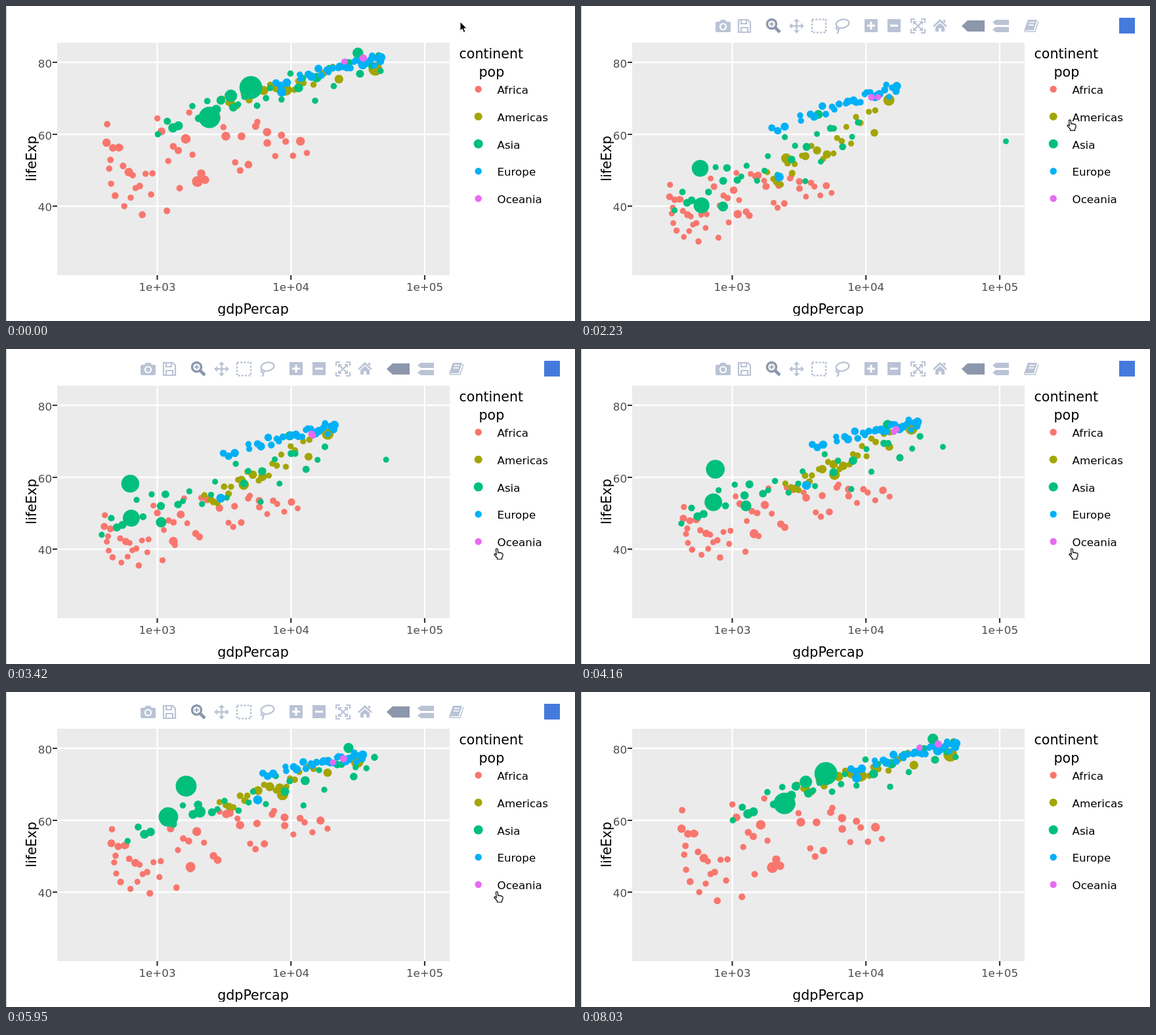
Write an HTML page that moves like this. It is 867x481 px and loops after 8480 ms.

```html
<!DOCTYPE html>
<html lang="en">
<head>
<meta charset="utf-8">
<title>Life expectancy and income</title>
<style>
  html, body { margin: 0; width: 100%; height: 100%; overflow: hidden; background: #fff; }
  svg { display: block; width: 867px; height: 481px; font: 16.7px "DejaVu Sans", Verdana, sans-serif; }
  .title { font-size: 20.6px; }
  .tick { fill: #4d4d4d; }
</style>
</head>
<body>
<svg viewBox="0 0 867 481">
  <path d="M.5 0V481" stroke="#cfcfcf" stroke-width="1.6"/>
  <path d="M78 56H676V411H78Z" fill="#ebebeb"/>
  <path d="M78 86H676M78 196H676M78 305.7H676M230.5 56V411M434.2 56V411M638 56V411" stroke="#fff" stroke-width="2.3"/>
  <path d="M71 86H78M71 196H78M71 305.7H78M230.5 411V418M434.2 411V418M638 411V418" stroke="#333" stroke-width="2.2"/>
  <g class="tick" text-anchor="end">
    <text x="70" y="94">80</text><text x="70" y="204">60</text><text x="70" y="313">40</text>
  </g>
  <g class="tick" text-anchor="middle">
    <text x="230.5" y="435">1e+03</text><text x="434.2" y="435">1e+04</text><text x="638" y="435">1e+05</text>
  </g>
  <g class="title">
    <text x="376.5" y="470" text-anchor="middle">gdpPercap</text>
    <text transform="translate(46 233) rotate(-90)" text-anchor="middle">lifeExp</text>
    <text x="690.5" y="80">continent</text><text x="720.5" y="108">pop</text>
  </g>
  <path d="M300 473H460V481H300Z" fill="#fff"/>
  <g id="legend"></g>
  <g id="dots"></g>
  <g id="toolbar" fill="#bac3d5" stroke="#bac3d5" stroke-width="0">
    <path d="M207 24H211L213 21H220L222 24H226Q228 24 228 26V38Q228 40 226 40H207Q205 40 205 38V26Q205 24 207 24Z"/>
    <circle cx="216.5" cy="31.5" r="4.5" fill="none" stroke="#fff" stroke-width="2.2"/>
    <path d="M240 21H254L258 25V40H240Z M244 21V27H252V21 M244 40V33H254V40" fill="none" stroke-width="2.2"/>
    <g fill="none" stroke="#8c97ab">
      <circle cx="290.5" cy="27.5" r="7" stroke-width="3.4"/>
      <path d="M296 33L303 40" stroke-width="4.6"/><path d="M287 27.5H294M290.5 24V31" stroke-width="1.6"/>
    </g>
    <path d="M328.5 22V39M320 30.5H337" stroke-width="2.4"/>
    <path d="M328.5 19L333 24H324ZM328.5 42L333 37H324ZM317 30.5L322 26V35ZM340 30.5L335 26V35Z"/>
    <path d="M352 20.5H373V40.5H352Z" fill="none" stroke-width="2.6" stroke-dasharray="3 2.2"/>
    <g fill="none" stroke-width="2.3">
      <ellipse cx="398.5" cy="27" rx="10" ry="6.5" transform="rotate(-12 398.5 27)"/>
      <path d="M390 31Q387 36 392 36Q395 35 392 32M392 36Q393 39 390 42"/>
    </g>
    <path d="M432 20H452V40H432ZM467 20H487V40H467Z"/>
    <path d="M436 30H448M442 24V36M471 30H483" stroke="#fff" stroke-width="3"/>
    <path d="M503 26V20H509M518 20H524V26M524 35V41H518M509 41H503V35" fill="none" stroke-width="2"/>
    <path d="M507 24L520 37M520 24L507 37" stroke-width="2.2"/>
    <path d="M506 23H512L506 29ZM521 23V29L515 23ZM521 38H515L521 32ZM506 38V32L512 38Z"/>
    <path d="M547 20L558 30.5L556 32L547 24L538 32L536 30.5ZM547 26L554 32V39H549V34H545V39H540V32ZM552 21H555V26L552 24Z"/>
    <path d="M580 30.5L589 22H615V39H589Z" fill="#8c97ab"/>
    <path d="M627 25L632 21H652V29H632ZM627 36L632 32H652V40H632Z"/>
    <path d="M681 21H695L690 37H677Q675 37 676 35Z"/>
    <path d="M676 36Q675 39 678 39H692L697 23" fill="none" stroke-width="1.5"/>
    <path d="M683 25H691M682 29H690" stroke="#fff" stroke-width="1.5"/>
    <path d="M820 18H844V42H820Z" fill="#447adb"/>
  </g>
  <path id="arrow" d="M0 0V14L3.2 11L5.5 16.5L8 15.4L5.7 10.2H10Z" stroke="#fff"/>
  <path id="hand" d="M3.5 1.5Q5 0 6.2 1.5L6.8 7Q8 5.8 9 7.3Q10.5 6.3 11.5 7.8Q13.3 7.2 14 9.2V12L12.5 15V17H5.5V15L1 10Q1 8 3 9L4.2 10Z" fill="#fff" stroke="#000" stroke-width="1.2"/>
</svg>
<script>
const LOOP = 8480, START = 600, STEP = 148.6;
const $ = id => document.getElementById(id);

// Each cloud runs from its poorest to its richest country, in 1957, 1982 and 2007:
// [log income low, high, life expectancy low, high, scatter].
// skew crowds the cloud to one end; giants: [population, then log income and life for each year].
const groups = [
  { name: 'Africa', color: '#f8766d', size: 5.2, count: 51, skew: 1.5, growth: .025,
    cloud: [[2.53, 3.74, 37, 47, 11], [2.65, 4.25, 45, 60, 11], [2.62, 4.12, 49, 60, 17]],
    giants: [[135, 3.04, 37.8, 3.2, 45.8, 3.3, 46.9]] },
  { name: 'Americas', color: '#a3a500', size: 6, count: 23, skew: 1, growth: .014,
    cloud: [[3.23, 4.1, 46, 66, 7], [3.4, 4.25, 59, 74, 4], [3.45, 4.4, 68, 78.5, 4]],
    giants: [[190, 3.4, 53.3, 3.85, 63.3, 3.96, 72.4], [301, 4.17, 69.5, 4.4, 74.7, 4.63, 78.2]] },
  { name: 'Asia', color: '#00bf7d', size: 7, count: 28, skew: 1, growth: .017,
    cloud: [[2.54, 3.95, 39, 62, 9], [2.63, 4.53, 50, 73, 7], [2.97, 4.67, 60, 81, 6]],
    giants: [[3, 5.05, 58, 4.5, 71.3, 4.67, 77.6], [127, 3.64, 65.5, 4.29, 77.1, 4.5, 82.6],
      [224, 2.93, 39.9, 3.18, 56.2, 3.55, 70.7], [1110, 2.77, 40.2, 2.93, 56.6, 3.39, 64.7],
      [1319, 2.76, 50.5, 2.98, 65.5, 3.7, 73]] },
  { name: 'Europe', color: '#00b0f6', size: 5.2, count: 29, skew: .55, growth: .005,
    cloud: [[3.13, 4.25, 59, 73, 2.5], [3.55, 4.46, 69.5, 76, 2], [3.75, 4.69, 72.5, 81, 2]],
    giants: [[71, 3.35, 48.1, 3.63, 61, 3.93, 71.8]] },
  { name: 'Oceania', color: '#e76bf3', size: 5.2, count: 0, growth: .014,
    giants: [[4, 4.09, 70.3, 4.25, 73.8, 4.4, 80.2], [20, 4.04, 70.3, 4.29, 74.7, 4.54, 81.2]] }
];

let seed = 7;
function random() {
  const v = Math.sin(++seed * 12.9898) * 43758.5453;
  return v - Math.floor(v);
}

function add(parent, tag, attrs) {
  const el = document.createElementNS('http://www.w3.org/2000/svg', tag);
  for (const key in attrs) el.setAttribute(key, attrs[key]);
  return parent.appendChild(el);
}

function makeCountry({ cloud, count, skew }, i) {
  const rank = ((i + random()) / count) ** skew;
  const luck = random() + random() - 1;
  const keys = cloud.flatMap(([g0, g1, l0, l1, scatter]) =>
    [g0 + (g1 - g0) * rank, l0 + (l1 - l0) * rank + scatter * luck]);
  return [4 + 80 * random() ** 4, ...keys];
}

const dots = [];
groups.forEach((group, row) => {
  const y = 127 + row * 41.75;
  add($('legend'), 'circle', { cx: 719.7, cy: y, r: group.size, fill: group.color });
  add($('legend'), 'text', { x: 748.5, y: y + 7 }).textContent = group.name;
  const small = Array.from({ length: group.count }, (_, i) => makeCountry(group, i));
  for (const [pop, ...keys] of [...small, ...group.giants]) {
    dots.push({ pop, keys, growth: group.growth, el: add($('dots'), 'circle', { fill: group.color }) });
  }
});

// Parabola through a, b and c at p = 0, .5 and 1.
const curve = (p, a, b, c) => a + (c - a) * p + (4 * b - 2 * a - 2 * c) * p * (1 - p);

function place({ pop, keys, growth, el }, year) {
  const p = (year - 1957) / 50;
  const income = curve(p, keys[0], keys[2], keys[4]);
  const life = curve(p, keys[1], keys[3], keys[5]);
  const people = pop * Math.exp(growth * (year - 2007));
  el.setAttribute('cx', 230.5 + 203.8 * (income - 3));
  el.setAttribute('cy', 526 - 5.5 * life);
  el.setAttribute('r', 4 + 13.5 * Math.sqrt(people / 1319));
}

// Linear interpolation through [time, ...values] keys.
function track(keys, t) {
  const n = keys.findIndex(key => key[0] > t);
  if (n === 0) return keys[0].slice(1);
  if (n < 0) return keys[keys.length - 1].slice(1);
  const a = keys[n - 1], b = keys[n], k = (t - a[0]) / (b[0] - a[0]);
  return a.slice(1).map((v, i) => v + (b[i + 1] - v) * k);
}

const pointer = [[600, 692, 24], [1490, 150, 500], [1780, 150, 500], [2230, 740, 172], [2820, 743, 304],
  [6400, 743, 304], [6980, 752, 310], [7440, 800, 420], [7740, 700, 500]];
const fade = [[600, 0], [890, 1], [1340, 1], [1490, 0], [1780, 0], [2080, 1], [7590, 1], [8020, 0]];

function draw(now) {
  // The picture advances in steps; the small lead keeps rounded step times on their own step.
  const step = Math.min(50, Math.floor((now % LOOP + 9 - START) / STEP));
  const t = step < 0 ? 0 : START + step * STEP;
  const year = t < 1780 ? 2007 : Math.min(2007, 1957.1 + (t - 2234) * .00947);
  dots.forEach(dot => place(dot, year));

  const [x, y] = track(pointer, t), overLegend = x > 700 && y > 110 && y < 330;
  $('toolbar').setAttribute('opacity', track(fade, t)[0]);
  for (const id of ['arrow', 'hand']) {
    $(id).setAttribute('transform', `translate(${x} ${y})`);
    $(id).setAttribute('visibility', (id === 'hand') === overLegend ? 'visible' : 'hidden');
  }
}

const begin = performance.now();
function tick() {
  draw(performance.now() - begin);
  requestAnimationFrame(tick);
}
tick();
</script>
</body>
</html>
```
